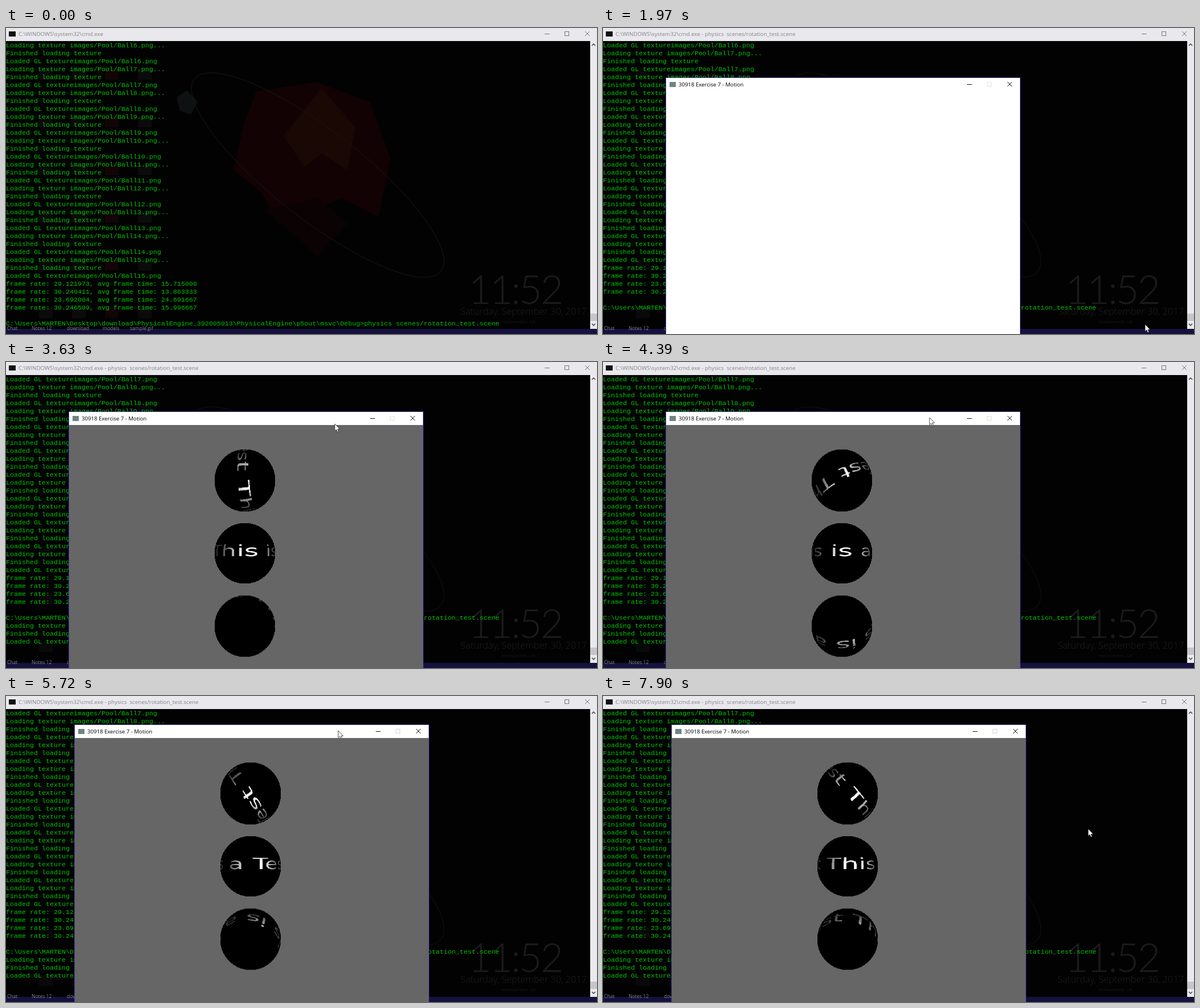
An HTML page with a canvas for the animation above (8000 ms loop, 1039 px wide and 539 px high).

```html
<!DOCTYPE html>
<html lang="en">
<head>
<meta charset="utf-8">
<title>Rotation test</title>
<style>
html, body { margin: 0; width: 100%; height: 100%; overflow: hidden; background: #000; }
canvas { display: block; }
</style>
</head>
<body>
<canvas id="stage" width="1039" height="539"></canvas>
<script>
const LOOP = 8000;
const ctx = document.getElementById('stage').getContext('2d');
const RAD = Math.PI / 180;
const UI = '"Open Sans", "Noto Sans", sans-serif';

// ---- drawing helpers ----
function rect(color, x, y, w, h) {
  ctx.fillStyle = color;
  ctx.fillRect(x, y, w, h);
}
function text(str, x, y, color, font, align = 'left') {
  ctx.fillStyle = color;
  ctx.font = font;
  ctx.textAlign = align;
  ctx.fillText(str, x, y);
}
function trace(points) {
  ctx.beginPath();
  for (let i = 0; i < points.length; i += 2) ctx.lineTo(points[i], points[i + 1]);
}
function shape(color, points) {
  trace(points);
  ctx.fillStyle = color;
  ctx.fill();
}
function line(color, points, width = 1) {
  trace(points);
  ctx.strokeStyle = color;
  ctx.lineWidth = width;
  ctx.stroke();
}
function buttons(x, y, color, boxColor) {
  line(color, [x - 4, y + .5, x + 4.5, y + .5]);
  ctx.strokeStyle = boxColor;
  ctx.strokeRect(x + 31.5, y - 3.5, 7, 7);
  line(color, [x + 67, y - 4, x + 75, y + 4]);
  line(color, [x + 75, y - 4, x + 67, y + 4]);
}

// ---- console ----
const rows = [];
function addTexture(name) {
  rows.push(`Loading texture ${name}...`, 'Finished loading texture', `Loaded GL texture${name}`);
}
for (let i = 6; i <= 15; i++) addTexture(`images/Pool/Ball${i}.png`);
for (const [rate, time] of [
  ['29.121973', '15.715000'], ['30.240411', '13.863333'],
  ['23.692004', '24.691667'], ['30.246509', '15.996667'],
]) rows.push(`frame rate: ${rate}, avg frame time: ${time}`);
rows.push('', 'C:\\Users\\MARTEN\\Desktop\\download\\PhysicalEngine_392005013\\PhysicalEngine' +
  '\\p5out\\msvc\\Debug>physics scenes/rotation_test.scene');
addTexture('images/test.png');

// [start time, lines scrolled, rows printed]
const scrolls = [[0, 0, 36], [1620, 1, 36], [1860, 2, 36], [2510, 4, 39], [2800, 5, 39]];

function drawWallpaper(t) {
  ctx.globalAlpha = t < 540 ? 1 : .75;
  shape('#120204', [440, 112, 545, 95, 640, 130, 676, 230, 655, 333, 590, 300, 480, 345,
    450, 290, 400, 250, 418, 170]);
  shape('#190803', [555, 106, 488, 190, 525, 245, 555, 221, 600, 250, 614, 175]);
  shape('#0a0203', [455, 320, 550, 300, 600, 345, 548, 402]);
  shape('#0d1112', [300, 122, 318, 110, 337, 130, 325, 152, 306, 146]);
  for (let y = 72; y < 520; y += 84)
    for (const x of [58, 116, 174, 232])
      rect((x + y) % 3 ? '#0b0b0b' : '#120505', x, y, 24, 19);
  ctx.strokeStyle = '#181818';
  ctx.lineWidth = 1;
  ctx.beginPath();
  ctx.ellipse(548, 259, 275, 78, 38 * RAD, 0, 7);
  ctx.stroke();
  ctx.globalAlpha = 1;
  ctx.letterSpacing = '-3px';
  text('11:52', 977, 486, '#1b1b1b', '300 70px Lato, sans-serif', 'right');
  ctx.letterSpacing = '0px';
  text('Saturday, September 30, 2017', 1021, 505, '#1f1f1f', '300 16.4px ' + UI, 'right');
  text('Hollowmere, UK', 901, 520, '#181818', '8px ' + UI, 'center');
}

function drawConsole(t) {
  rect('#020203', 0, 22, 1027, 508);
  drawWallpaper(t);

  const [, top, count] = scrolls.findLast(s => t >= s[0]);
  for (let i = top; i < count; i++)
    text(rows[i], 0, 34 + 14 * (i - top), '#00c400', '11.665px "Liberation Mono", monospace');
  if (t >= 1030 && t < 1620) rect('#00c400', 868, 524, 7, 2);

  rect('#e8e8ed', 0, 0, 1039, 23);
  rect('#111', 5, 6, 12, 9);
  const active = t >= 540 && t < 1860;
  text('C:\\WINDOWS\\system32\\cmd.exe' + (t < 1620 ? '' : ' - physics  scenes/rotation_test.scene'),
    22, 14, active ? '#000' : '#858589', '9.75px ' + UI);
  buttons(951, 10, active ? '#111' : '#777', active ? '#111' : '#777');

  rect('#e9e9ee', 1027, 23, 12, 507);
  rect('#c6c6ca', 1027, 503, 12, 13);
  line('#444', [1030, 31, 1033, 28, 1036, 31], 1.5);
  line('#444', [1030, 521, 1033, 524, 1036, 521], 1.5);

  rect('#15123f', 0, 530, 1039, 9);
  ['Chat', 'Notes 12', 'download', 'models', 'sample.gif'].forEach((s, i) =>
    text(s, 2 + [0, 43, 105, 168, 216][i], 532, 'rgba(255,255,255,.5)', '8.5px ' + UI));
}

// ---- spheres ----
const TW = 540, TH = 270, PX = TW / 360;
const SIZE = 112, R = 53.5;
const texture = (() => {
  const c = new OffscreenCanvas(TW, TH).getContext('2d');
  const words = 'This is a Test ';
  c.font = `${30 * PX}px "DejaVu Sans", sans-serif`;
  c.fillStyle = '#fff';
  c.scale(TW / c.measureText(words).width, 1);
  c.fillText(words, 0, TH / 2 + 5.4 * PX);
  return c.getImageData(0, 0, TW, TH).data;
})();
const ballCanvas = new OffscreenCanvas(SIZE, SIZE);
const ballCtx = ballCanvas.getContext('2d');
const ballImage = ballCtx.createImageData(SIZE, SIZE);

function turn(a, b, degrees) {
  const c = Math.cos(degrees * RAD), s = Math.sin(degrees * RAD);
  return [a * c + b * s, b * c - a * s];
}
// Each ball spins about one world axis; pitch is the angle it is seen from.
const balls = [
  { axis: 'z', y: 120.7, ry: 55, pitch: 14.5 },
  { axis: 'y', y: 249, ry: 53.5, pitch: 0 },
  { axis: 'x', y: 377.3, ry: 54.4, pitch: -9 },
];

function drawBall(ball, cx, cy, angle) {
  const data = ballImage.data;
  for (let py = 0, k = 0; py < SIZE; py++) {
    for (let px = 0; px < SIZE; px++, k += 4) {
      let x = (px + .5 - SIZE / 2) / R, y = (SIZE / 2 - py - .5) / R;
      const rest = 1 - x * x - y * y;
      data[k + 3] = rest > 0 ? 255 : 0;
      if (rest <= 0) continue;
      let z = Math.sqrt(rest);
      const light = Math.min(1, .18 + .9 * Math.max(0, .14 * x + .99 * z) ** 3.5);
      [z, y] = turn(z, y, ball.pitch);
      [x, z] = turn(x, z, 9);
      if (ball.axis === 'z') [x, y] = turn(x, y, -angle);
      else if (ball.axis === 'y') [x, z] = turn(x, z, angle);
      else [z, y] = turn(z, y, angle);
      const lon = (Math.atan2(x, z) / RAD + 346 + 360) % 360;
      const lat = Math.asin(Math.max(-1, Math.min(1, y))) / RAD;
      const u = Math.floor(lon * PX) % TW;
      const v = Math.min(TH - 1, Math.floor((90 - lat) * PX));
      data[k] = data[k + 1] = data[k + 2] = texture[(v * TW + u) * 4 + 3] * light;
    }
  }
  ballCtx.putImageData(ballImage, 0, 0);
  const h = SIZE * ball.ry / R;
  ctx.drawImage(ballCanvas, cx - SIZE / 2, cy - h / 2, SIZE, h);
}

// ---- application window ----
function drawWindow(t) {
  if (t < 1860) return;
  const [x, y] = t < 5580 ? [110, 88] : t < 5720 ? [125, 70] : [120, 51];
  rect('#41379a', x, y - 1, 624, 500);
  rect('#fff', x + 1, y, 622, 500);
  rect('#6f8584', x + 7, y + 7, 11, 9);
  text('30918 Exercise 7 - Motion', x + 23, y + 15, '#000', '9.6px ' + UI);
  buttons(x + 534, y + 11, '#111', t < 5580 ? '#e6e2d2' : '#d2d2e4');
  if (t < 2510) return;
  rect('#666', x + 1, y + 23, 622, 500);
  // The simulation stands still while the window is dragged.
  const time = t < 5350 ? t : Math.max(5350, t - 570);
  const angle = 2 + .087 * (time - 2640);
  for (const ball of balls) drawBall(ball, x + 310, y + ball.y, angle);
}

// ---- pointer: time, x, y ----
const path = [
  [100, 957, 526], [320, 957, 522], [970, 957, 522], [1090, 953, 522], [2450, 953, 522],
  [2640, 865, 447], [3290, 589, 125], [3630, 578, 109], [4100, 574, 98], [5350, 574, 98],
  [5580, 589, 81], [5720, 584, 61], [6000, 584, 61], [6460, 842, 155], [6900, 870, 195],
  [7460, 853, 226], [7900, 853, 234],
];
function drawPointer(t) {
  if (t < path[0][0]) return;
  const i = path.findLastIndex(p => t >= p[0]);
  const a = path[i], b = path[i + 1] || a;
  const f = b === a ? 0 : (t - a[0]) / (b[0] - a[0]);
  ctx.save();
  ctx.translate(Math.round(a[1] + (b[1] - a[1]) * f), Math.round(a[2] + (b[2] - a[2]) * f));
  const arrow = [0, 0, 0, 12.5, 2.8, 10, 4.8, 14.5, 6.8, 13.6, 4.9, 9.2, 8.8, 9.2, 0, 0];
  shape('#fff', arrow);
  line('#222', arrow, .8);
  ctx.restore();
}

function frame(now) {
  const t = now % LOOP;
  drawConsole(t);
  drawWindow(t);
  drawPointer(t);
  requestAnimationFrame(frame);
}
const start = performance.now();
requestAnimationFrame(function first() {
  frame(performance.now() - start);
});
</script>
</body>
</html>
```
